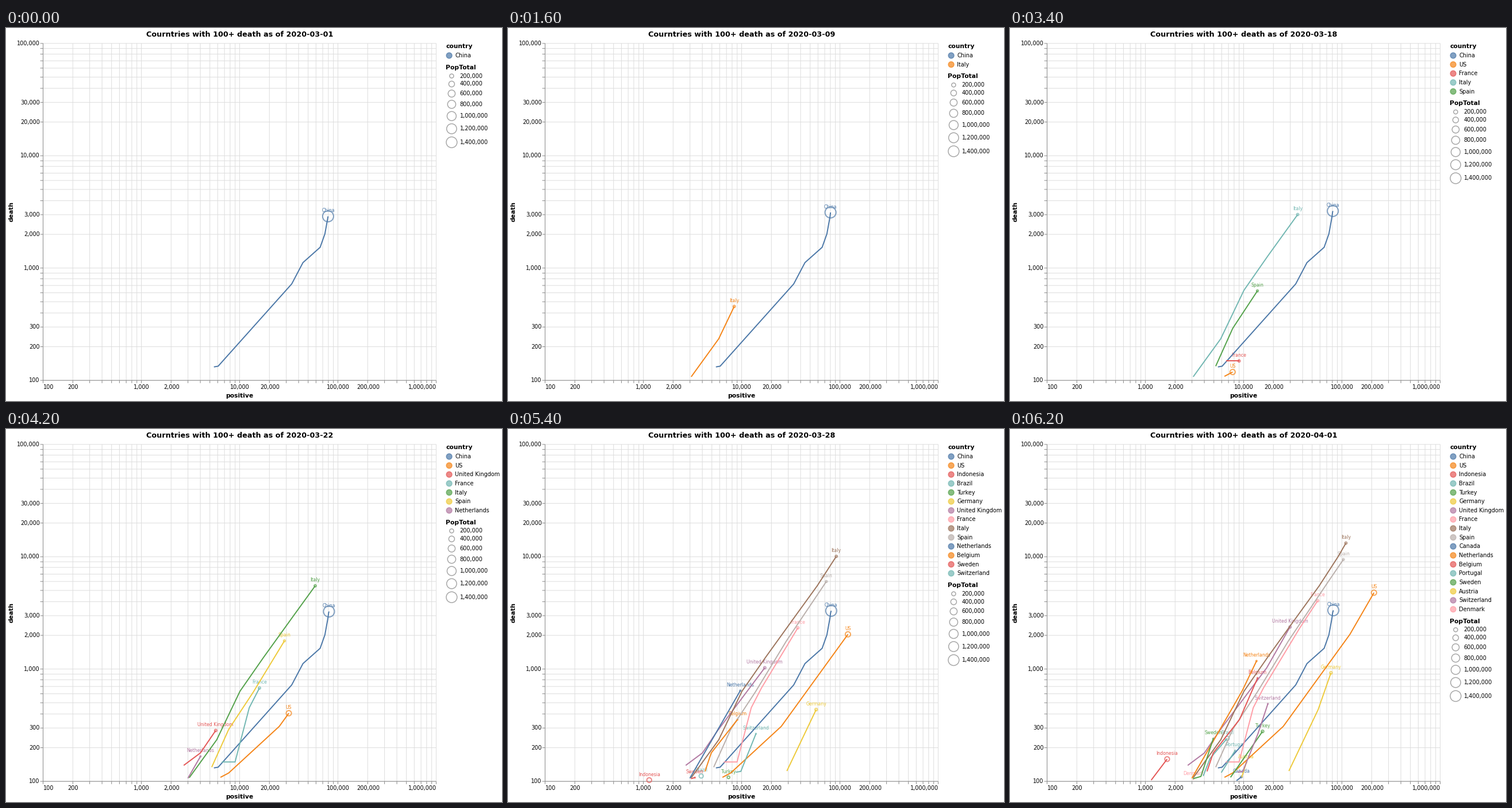
Recreate the animation shown at these times as a matplotlib script. Size 863 by 649 pixels, loop 6400 ms.

```python
import math

import numpy as np
import matplotlib.pyplot as plt
from matplotlib.animation import FuncAnimation
from matplotlib.collections import LineCollection
from matplotlib.patches import Circle

W, H, DPI = 863, 649, 64
PT = 72 / DPI                       # points per pixel
S = 684 / 700                       # scale of the 700 x 600 chart
LEFT, BOTTOM = 64.5, 613.1          # axis corner
RIGHT, TOP = LEFT + 700 * S, BOTTOM - 600 * S
MARK_SHIFT = -S / 2                 # marks sit half a unit off the grid
DAYS = 32
PALETTE = ["#4c78a8", "#f58518", "#e45756", "#72b7b2", "#54a24b",
           "#eeca3b", "#b279a2", "#ff9da6", "#9d755d", "#bab0ac"]

plt.rcParams["font.family"] = "DejaVu Sans"


def x_units(value):
    return 175 * np.log10(np.asarray(value) / 100)


def y_units(value):
    return 200 * np.log10(np.asarray(value) / 100)


countries = []


def add(name, millions, *keys):
    """Exponential growth between (day, cases, deaths); day 1 is March 1."""
    days, cases, deaths = np.array(keys).T
    daily = np.arange(days[0], DAYS + 1)
    x = LEFT + MARK_SHIFT + S * np.interp(daily, days, x_units(cases))
    y = BOTTOM + MARK_SHIFT - S * np.interp(daily, days, y_units(deaths))
    countries.append((name, millions, days[0], np.column_stack([x, y])))


# Largest population first: this is also the legend order
add("China", 1439, (-32, 5509, 131), (-31, 6087, 133), (-22, 34110, 718),
    (-18, 44386, 1112), (-15, 66358, 1521), (-11, 74211, 2003),
    (1, 79932, 2872), (10, 80887, 3139), (32, 82361, 3316))
add("US", 331, (17, 6421, 108), (18, 7783, 118), (21, 25489, 307),
    (28, 121478, 2026), (32, 213372, 4757))
add("Indonesia", 273, (28, 1155, 102), (32, 1677, 157))
add("Brazil", 212, (28, 3904, 111), (30, 4579, 159), (32, 6836, 240))
add("Turkey", 84, (28, 7402, 108), (32, 15679, 277))
add("Germany", 83.8, (23, 29056, 123), (28, 57695, 433), (32, 77872, 920))
add("United Kingdom", 67.9, (19, 2716, 138), (20, 4014, 178),
    (22, 5745, 282), (28, 17312, 1021), (32, 29865, 2357))
add("France", 65.3, (16, 6633, 148), (18, 9043, 148), (20, 12612, 450),
    (22, 16018, 674), (28, 37575, 2314), (32, 56989, 4032))
add("Italy", 60.5, (4, 3089, 107), (7, 5883, 233), (10, 10149, 631),
    (13, 17660, 1266), (18, 35713, 2978), (22, 59138, 5476),
    (28, 92472, 10023), (32, 110574, 13155))
add("Spain", 46.8, (13, 5232, 133), (15, 7798, 289), (18, 13910, 623),
    (22, 28768, 1772), (28, 73235, 5982), (32, 104118, 9387))
add("Canada", 37.7, (31, 8527, 101), (32, 9560, 109))
add("Netherlands", 17.1, (20, 2994, 106), (28, 9762, 639), (32, 13614, 1173))
add("Belgium", 11.6, (24, 4269, 122), (25, 4937, 178), (28, 9134, 353),
    (32, 13964, 828))
add("Portugal", 10.2, (29, 5962, 119), (32, 8251, 187))
add("Sweden", 10.1, (27, 3069, 105), (29, 3700, 110), (32, 4947, 239))
add("Austria", 9.0, (30, 9618, 108), (32, 10711, 146))
add("Switzerland", 8.7, (23, 8795, 120), (24, 9877, 122), (28, 14076, 264),
    (32, 17768, 488))
add("Denmark", 5.8, (32, 3107, 104))

fig = plt.figure(figsize=(W / DPI, H / DPI), dpi=DPI, facecolor="white")
ax = fig.add_axes([0, 0, 1, 1])
ax.set_xlim(0, W)
ax.set_ylim(H, 0)
ax.axis("off")


def label(x, y, text, size=10, **style):
    style = {"ha": "left", "va": "baseline", "color": "black", **style}
    return ax.text(x, y, text, fontsize=size * S * PT, **style)


def segments(lines, color, zorder):
    lines = LineCollection(lines, colors=color, linewidths=S * PT, zorder=zorder)
    lines.set_snap(False)
    ax.add_collection(lines)


def ring(x, y, radius, color, width, fill=False):
    return ax.add_patch(Circle((x, y), radius, facecolor=color if fill else "none",
                               edgecolor=color, lw=width * S * PT, alpha=0.7,
                               zorder=2))


def pop_radius(millions):
    return S * math.sqrt(300 / math.pi * millions / 1439)


def log_ticks(decades):
    ticks = [m * 10 ** d for d in range(2, 2 + decades) for m in range(1, 10)]
    return ticks + [10 ** (2 + decades)]


def draw_axes():
    tick = 5 * S
    x_ticks, y_ticks = log_ticks(4), log_ticks(3)
    xs = LEFT + S * np.round(x_units(x_ticks))
    ys = BOTTOM - S * np.round(y_units(y_ticks))
    segments([[(x, TOP), (x, BOTTOM)] for x in xs]
             + [[(LEFT, y), (RIGHT, y)] for y in ys], "#dddddd", 0)
    segments([[(x, BOTTOM), (x, BOTTOM + tick)] for x in xs]
             + [[(LEFT - tick, y), (LEFT, y)] for y in ys]
             + [[(LEFT, TOP), (LEFT, BOTTOM)], [(LEFT, BOTTOM), (RIGHT, BOTTOM)]],
             "#888888", 1)
    for x, value in zip(xs, x_ticks):
        if str(value)[0] in "12":
            align = {100: "left", 10 ** 6: "right"}.get(value, "center")
            label(x + 0.5, 628.3, f"{value:,}", ha=align)
    for y, value in zip(ys, y_ticks):
        if str(value)[0] in "123":
            label(58.8, y + 3.2, f"{value:,}", ha="right")
    label(406.6, 642.7, "positive", 11, weight="bold", ha="center")
    label(15, 319.8, "death", 11, weight="bold", rotation=90,
          ha="right", va="center")


draw_axes()
label(765.2, 35.2, "country", 11, weight="bold")
title = label(406.6, 14.8, "", 13, weight="bold", ha="center")
moving = []


def draw_pop_legend(shift):
    moving.append(label(765.2, 71.8 + shift, "PopTotal", 11, weight="bold"))
    y = 83.5 + shift
    for i in range(1, 8):
        radius = pop_radius(200 * i)
        moving.append(ring(775.4, y, radius, "gray", 1.5))
        moving.append(label(789.7, y + 3, f"{200000 * i:,}"))
        y += radius + pop_radius(200 * (i + 1)) + 5.4


def draw_country(row, color, name, millions, path):
    x, y = path[-1]
    moving.append(ring(x, y, pop_radius(millions), color, 2))
    moving.append(label(x, y - 7.4, name, 8, color=color, ha="center", zorder=3))
    moving.extend(ax.plot(path[:, 0], path[:, 1], color=color, lw=2 * S * PT,
                          solid_capstyle="butt", solid_joinstyle="miter",
                          zorder=4))
    legend_y = 47.9 + 16 * S * row
    moving.append(ring(771.1, legend_y, 5 * S, color, 1.5, fill=True))
    moving.append(label(781, legend_y + 3.1, name))


def update(frame):
    while moving:
        moving.pop().remove()
    day = frame + 1
    date = f"2020-03-{day:02d}" if day <= 31 else f"2020-04-{day - 31:02d}"
    title.set_text(f"Courntries with 100+ death as of {date}")

    shown = [c for c in countries if c[2] <= day]
    for row, (name, millions, first_day, path) in enumerate(shown):
        draw_country(row, PALETTE[row % len(PALETTE)], name, millions,
                     path[:day - first_day + 1])
    draw_pop_legend(16 * S * (len(shown) - 1))
    return moving


anim = FuncAnimation(fig, update, frames=DAYS, interval=200,
                     init_func=lambda: update(0), repeat=True, repeat_delay=0,
                     blit=False)
plt.show()
```
